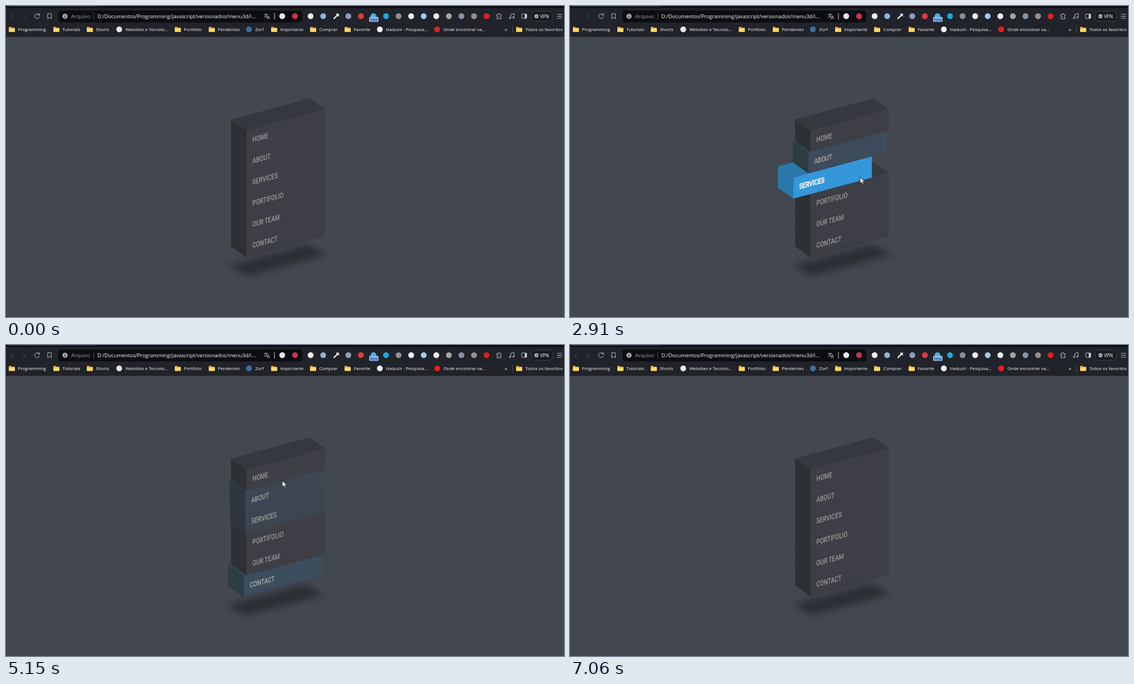
An HTML page for the animation above (7520 ms loop, 1002 by 559 pixels).

```html
<!DOCTYPE html>
<html lang="pt">
<head>
<meta charset="utf-8">
<title>Menu 3D</title>
<style>
html, body { margin: 0; width: 100%; height: 100%; overflow: hidden; background: #434750; }
svg { display: block; width: 1002px; height: 559px; }
text { font-family: "Open Sans", "Noto Sans", sans-serif; font-weight: 500; white-space: pre; }
.label { font: 500 14.2px Roboto, "Liberation Sans", sans-serif; }
.line { fill: none; stroke: #b9bbc1; stroke-linecap: round; stroke-linejoin: round; }
</style>
</head>
<body>
<svg viewBox="0 0 1002 559" xmlns="http://www.w3.org/2000/svg">
  <defs>
    <filter id="soft" x="-30%" y="-100%" width="160%" height="300%"><feGaussianBlur stdDeviation="10"/></filter>
    <g id="folder">
      <path d="M0 1.2Q0 0 1.2 0H4.2L5.6 1.5H10Q11 1.5 11 2.5V9H0Z" fill="#e5ab3c"/>
      <path d="M0 3H11V8Q11 9 10 9H1Q0 9 0 8Z" fill="#ffd868"/>
    </g>
  </defs>
  <rect width="1002" height="559" fill="#434750"/>
  <g id="menu"></g>

  <rect width="1002" height="55.5" fill="#202329"/>
  <rect width="1002" height="3.5" fill="#0e0f13"/>
  <path d="M5 .5H163" stroke="#3a3d44"/>
  <rect x="94" y="8" width="438" height="21.5" rx="5" fill="#0c0d12"/>
  <g class="line">
    <path d="M12.5 14.5L8.5 18.5L12.5 22.5M30.5 14.5L34.5 18.5L30.5 22.5" stroke="#565960"/>
    <path d="M59.6 16A4.4 4.4 0 1 0 60 19.6M60 13.2V16.3H56.8"/>
    <path d="M75.2 13.8H81.4V23L78.3 20.3L75.2 23Z"/>
    <path d="M157.5 13V24M909.5 37V48" stroke="#51545b"/>
    <path d="M482 13V24" stroke="#d5d6da"/>
    <path d="M463.5 15.3H470M466.7 14V15.3M469 15.3Q467.5 19.5 463.5 21M465 17Q466.5 19.5 468.5 20M468.5 23.3L471 17.5L473.4 23.3M469.4 21.3H472.4"/>
    <path d="M589 22.5L595 16.5" stroke="#fff" stroke-width="2.2"/>
    <path d="M594 14.5L597.2 17.7M596 15.8L597 14.6" stroke="#fff" stroke-width="2"/>
    <path d="M881.5 15.5H884Q883.6 13.4 885.3 13.4T886.6 15.5H889V18Q887 17.7 887 19.2T889 20.6V23H881.5V20.6Q883.5 20.6 883.5 19.2T881.5 18Z"/>
    <path d="M906.5 21.5V15L912.5 13.7V20.5"/>
    <circle cx="905" cy="21.6" r="1.5"/><circle cx="911" cy="20.6" r="1.5"/>
    <rect x="926" y="14.3" width="9" height="8" rx="1"/>
    <path d="M990 15H998M990 18.5H998M990 22H998"/>
  </g>
  <rect x="931.5" y="14.5" width="3.5" height="7.6" fill="#d0d2d6"/>
  <circle cx="106" cy="18.5" r="4.7" fill="#a3a5ab"/>
  <path d="M106 18V21M106 15.8V16.6" stroke="#0c0d12" stroke-width="1.2"/>
  <text x="117" y="22" font-size="9.5" fill="#9b9da4">Arquivo</text>
  <text x="164" y="22" font-size="9.3" fill="#fff">D:/Documentos/Programming/javascript/versionados/menu3d/i...</text>
  <g id="bar"></g>
  <rect x="652" y="19.5" width="17" height="9" rx="1.5" fill="#8ab8f5"/>
  <text x="660.5" y="26.6" font-size="7" text-anchor="middle" fill="#16213a">New</text>
  <rect x="943.5" y="9.5" width="37.5" height="18" rx="5" fill="#191b20" stroke="#3c3f47"/>
  <circle cx="952.5" cy="18.4" r="3.6" fill="#b5b7bd"/>
  <path d="M950.7 18.4H954.3" stroke="#191b20" stroke-width="1.1"/>
  <text x="959" y="21.5" font-size="8.2" fill="#fff">VPN</text>
  <text x="895" y="46" font-size="11" fill="#c6c8cc">»</text>

  <g id="cursor" stroke="#14161a" stroke-width=".9" stroke-linejoin="round">
    <path id="arrow" d="M0 0V11.5L2.7 9L4.4 13L6.3 12.2L4.6 8.3H8.2Z" fill="#fff"/>
    <g id="hand" transform="translate(-4 -.5)">
      <path d="M3 8.3V1.4Q3 .3 4 .3T5 1.4V5.4L8.6 6.3Q10.3 6.8 10 8.6L9.2 12.5V15H4.2V13.3L.7 9Q.2 7.7 1.3 7.4Q2.2 7.4 3 8.3Z" fill="#fff"/>
      <path d="M6.7 6V8M8.4 6.5V8.2" stroke-width=".5"/>
    </g>
  </g>
</svg>
<script>
const LOOP = 7520, STEP = 68, PHASE = 788, EASE_MS = 500;
const LEFT = 432, TOP = 223.9, WIDE = 141, TALL = 38, SLOPE = Math.tan(Math.PI / 12);
const PUSH = { x: -35, y: 35 * SLOPE };

const $ = id => document.getElementById(id);
const make = (parent, tag, attrs, text = "") => {
  const el = document.createElementNS("http://www.w3.org/2000/svg", tag);
  for (const k in attrs) el.setAttribute(k, attrs[k]);
  el.textContent = text;
  return parent.appendChild(el);
};
const dot = (x, y, fill) => make($("bar"), "circle", { cx: x, cy: y, r: 5.2, fill });

// Evenly spaced extension buttons; the third place holds the dropper
dot(496, 18.3, "#e6e7ea");
dot(519, 18.3, "#c8384a");
["#f2f2f2", "#8fb4d8", "", "#8e9db8", "#e33b3b", "#3fb2dc", "#1fa5dc", "#8d8f94", "#f1f1f1",
 "#9accf2", "#f0f0f0", "#a5a49f", "#8b929e", "#98908f", "#e21f26"
].forEach((fill, i) => fill && dot(547 + 22.57 * i, 18.3, fill));

// Bookmarks: a folder, or a dot where a colour is given
[[5, "Programming"], [85, "Tutoriais"], [145, "Shorts"], [198, "Websites e Tecnolo...", "#e8e8ea"],
 [303, "Portfolio"], [364, "Pendentes"], [431, "Zorf", "#3d6f9f"], [476, "Importante"],
 [546, "Comprar"], [608, "Favorite"], [666, "traduzir - Pesquisa...", "#f1f1f3"],
 [769, "Onde encontrar va...", "#ee1c1c"], [916, "Todos os favoritos"]
].forEach(([x, label, fill]) => {
  if (fill) dot(x + 5.3, 42, fill);
  else make($("bar"), "use", { href: "#folder", x, y: 37.5 });
  make($("bar"), "text", { x: x + 16.4, y: 45, "font-size": 7.95, fill: "#fff" }, label);
});

// Faces: outline, resting colour, hovered colour
const rise = WIDE * SLOPE;
const FACES = [
  [`-28,-20 0,0 0,${TALL} -28,${TALL - 20}`, [46, 49, 51], [41, 130, 185]],
  [`-28,-20 ${WIDE - 28},${-20 - rise} ${WIDE},${-rise} 0,0`, [53, 56, 62], [41, 130, 185]],
  [`0,0 ${WIDE},${-rise} ${WIDE},${TALL - rise} 0,${TALL}`, [62, 63, 70], [51, 163, 238]]
];
const items = ["HOME", "ABOUT", "SERVICES", "PORTIFOLIO", "OUR TEAM", "CONTACT"].map((name, i) => {
  const g = make($("menu"), "g", {});
  $("menu").prepend(g);
  const faces = FACES.map(([points]) => make(g, "polygon", { points }));
  const label = make(g, "text", { class: "label", x: 15, y: 25.2, transform: "matrix(.705 -.189 0 .95 0 0)" }, name);
  return { g, faces, label, visits: [] };
});
make(items[5].g, "rect", {
  width: 200, height: 40, opacity: .35, filter: "url(#soft)", transform: "matrix(.705 -.189 .7 .5 -28 52)"
});

// Hovers: a slow way down, a quick way up, a rest on the first item, a sweep down
const visit = (i, on, off) => items[i].visits.push([on, off]);
const enter = [1268, 1750, 2598, 3200, 3785, 4285], turn = 4860, rest = 5176, leave = 5770;
enter.forEach((on, i) => visit(i, on, enter[i + 1] || turn));
for (let i = 4; i > 0; i--) visit(i, turn + 79 * (4 - i), turn + 79 * (5 - i));
visit(0, rest, leave);
for (let i = 1; i < 6; i++) visit(i, leave + 44 * (i - 1), leave + 44 * i);

// Pointer stops: time, x, y; on the way down they lie on the lower edge of the item being left
const edge = (i, x) => TOP + TALL * i + PUSH.y - (x - LEFT - PUSH.x) * SLOPE;
const stops = [
  [190, 894, 455], [480, 784, 205], [590, 797, 190], [790, 797, 190], [enter[0], 572, 203], [1468, 501, 217],
  ...enter.slice(1).map((t, k) => {
    const x = Math.min(522, 499 + 17 * k);
    return [t, x, edge(k + 1, x)];
  }),
  [4530, 520, 412], [turn, 519, 390], [5480, 490, 205], [5700, 490, 205], [6320, 520, 484], [7050, 973, 552]
];

function pointer(t) {
  const k = stops.findIndex(s => s[0] > t);
  if (k < 1) return stops.at(k).slice(1);
  const [t0, x0, y0] = stops[k - 1], [t1, x1, y1] = stops[k];
  const p = 1 - (1 - (t - t0) / (t1 - t0)) ** 2.6;
  return [x0 + (x1 - x0) * p, y0 + (y1 - y0) * p];
}

// CSS "ease", solved by bisection
const bez = (s, a, b) => 3 * (1 - s) ** 2 * s * a + 3 * (1 - s) * s * s * b + s ** 3;
function ease(x) {
  if (x <= 0) return 0;
  if (x >= 1) return 1;
  let lo = 0, hi = 1;
  for (let i = 0; i < 24; i++) {
    const mid = (lo + hi) / 2;
    if (bez(mid, .25, .25) < x) lo = mid; else hi = mid;
  }
  return bez(lo, .1, 1);
}

// An interrupted transition returns in proportionally less time
function slide(t, [on, off]) {
  if (t < off) return ease((t - on) / EASE_MS);
  const peak = ease((off - on) / EASE_MS);
  return peak * (1 - ease((t - off) / (EASE_MS * peak)));
}

const mix = (a, b, p) => `rgb(${a.map((v, i) => Math.round(v + (b[i] - v) * p))})`;

function draw(now) {
  const t = now % LOOP;
  const held = PHASE + STEP * Math.floor((t - PHASE) / STEP);
  const [px, py] = pointer(held);
  let hand = false;

  items.forEach(({ g, faces, label, visits }, i) => {
    const p = Math.max(...visits.map(v => slide(held, v)));
    const x = LEFT + PUSH.x * p, y = TOP + TALL * i + PUSH.y * p;
    g.setAttribute("transform", `translate(${x} ${y})`);
    faces.forEach((face, k) => face.setAttribute("fill", mix(FACES[k][1], FACES[k][2], p)));
    const ink = mix([153, 153, 153], [255, 255, 255], p);
    label.setAttribute("fill", ink);
    label.setAttribute("stroke", ink);
    label.setAttribute("stroke-width", .8 * p);

    // The link fills the middle of the front face
    const depth = py - y + (px - x) * SLOPE;
    hand ||= px > x && px < x + WIDE && depth > 5 && depth < 31;
  });

  $("cursor").setAttribute("transform", `translate(${px} ${py})`);
  $("cursor").setAttribute("visibility", t >= 190 && t < 7055 ? "visible" : "hidden");
  $("arrow").setAttribute("display", hand ? "none" : "inline");
  $("hand").setAttribute("display", hand ? "inline" : "none");
}

const start = performance.now();
function tick() {
  draw(performance.now() - start);
  requestAnimationFrame(tick);
}
tick();
</script>
</body>
</html>
```
